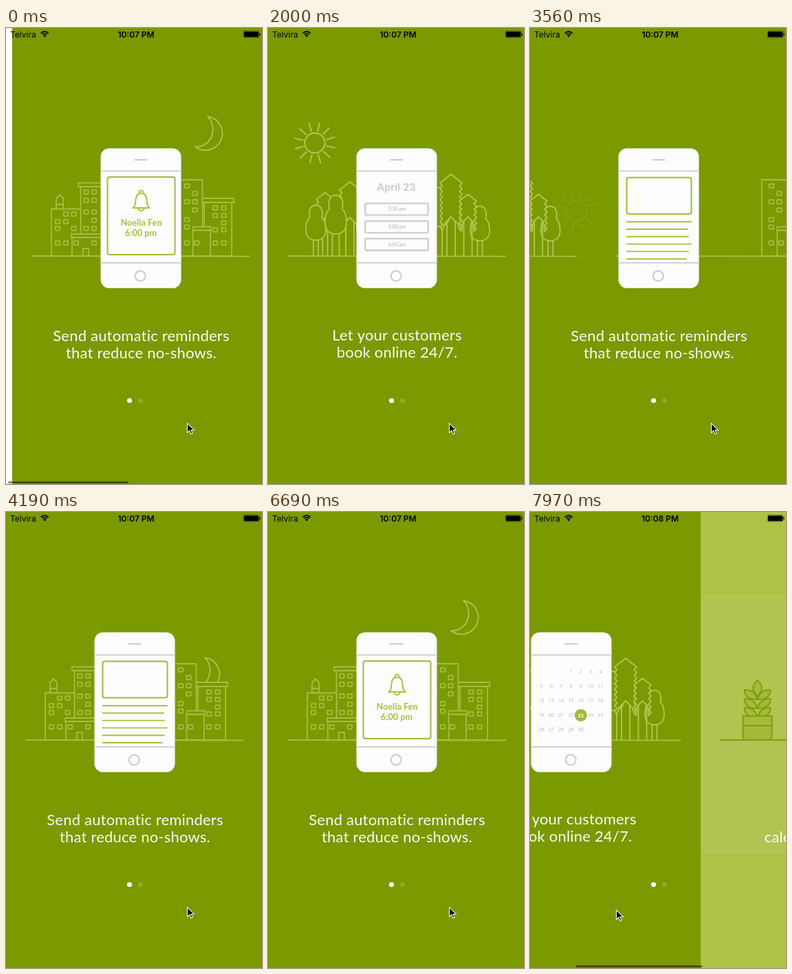
Animation of 372x664 px, one loop 8000 ms. Source, as an HTML page with a canvas:

```html
<!DOCTYPE html>
<html lang="en">
<head>
<meta charset="utf-8">
<title>Booking app tour</title>
<style>
html, body { margin: 0; width: 100%; height: 100%; overflow: hidden; background: #fff; }
canvas { display: block; width: 372px; height: 664px; }
</style>
</head>
<body>
<canvas id="stage"></canvas>
<script>
const W = 372, H = 664, PAGE = 375, LOOP = 8000;
const GREEN = '#7b9900', LIME = '#b0c54c', DIM = '#a8bd40', GRAY = '#cbcbcb';
const LATO = 'Lato, sans-serif', INTER = 'Inter, sans-serif', NOTO = '"Noto Sans", sans-serif';

const canvas = document.getElementById('stage');
const c = canvas.getContext('2d');
const dpr = window.devicePixelRatio || 1;
canvas.width = W * dpr;
canvas.height = H * dpr;

const clamp = v => Math.max(0, Math.min(1, v));
const span = (t, a, b) => clamp((t - a) / (b - a));
const mix = (a, b, p) => a + (b - a) * p;
const ease = (t, a, b) => {
  const p = span(t, a, b);
  return p < .5 ? 4 * p ** 3 : 1 - (2 - 2 * p) ** 3 / 2;
};

function group(alpha, x, y, draw) {
  if (alpha <= 0) return;
  c.save();
  c.globalAlpha *= alpha;
  c.translate(x, y);
  draw();
  c.restore();
}

function pen(color, width) {
  c.strokeStyle = color;
  c.lineWidth = width;
  c.lineCap = c.lineJoin = 'round';
}

function line(x1, y1, x2, y2) {
  c.beginPath();
  c.moveTo(x1, y1);
  c.lineTo(x2, y2);
  c.stroke();
}

function disc(x, y, r, color) {
  c.fillStyle = color;
  c.beginPath();
  c.arc(x, y, r, 0, 7);
  c.fill();
}

function ring(x, y, r) {
  c.beginPath();
  c.arc(x, y, r, 0, 7);
  c.stroke();
}

function round(x, y, w, h, r) {
  c.beginPath();
  c.roundRect(x, y, w, h, r);
}

function fillPath(d, color) {
  c.fillStyle = color;
  c.fill(new Path2D(d));
}

// A shape given as path data: filled to hide what is behind, then outlined.
function shape(d, fill) {
  if (fill) fillPath(d, fill);
  c.stroke(new Path2D(d));
}

function box(x1, y1, x2, y2) {
  shape(`M${x1} ${y1}H${x2}V${y2}H${x1}Z`, GREEN);
}

function text(s, x, y, font, color, align = 'center', spacing = 0) {
  c.font = font;
  c.fillStyle = color;
  c.textAlign = align;
  c.letterSpacing = spacing + 'px';
  c.fillText(s, x, y);
}

function caption(lines, y) {
  lines.forEach((s, i) => text(s, 187.5, y + 25 * i, '22px ' + LATO, '#fafcf2', 'center', .2));
}

function windows(spots) {
  for (const [y, ...xs] of spots) {
    for (const x of xs) {
      round(x - 3.2, y - 2.8, 6.4, 5.6, .5);
      c.stroke();
    }
  }
}

function ground(x) {
  pen(DIM, 1.8);
  line(29 + x, 332, 345.5 + x, 332.5);
}

function city() {
  pen(DIM, 1.8);
  box(99.5, 231, 136, 332);
  box(96, 225.5, 136, 231);
  windows([[239, 107.5, 119], [251, 107.5, 119], [268, 107.5, 119], [280, 119], [292, 107.5, 119]]);
  shape('M64 263V248L69 243L74 248V263M64 257H74');
  box(57, 263.5, 99.5, 332);
  windows([[271, 78, 89.5], [282, 66, 78], [292, 66, 89.5], [313, 66, 78]]);
  box(87, 305, 136, 332);
  box(86, 300, 136, 305);
  windows([[313, 93, 119]]);
  shape('M103 332V321H111V332');

  box(240, 221, 276.5, 332);
  windows([[230, 254], [241, 265.5], [253, 254, 265.5], [265, 265.5], [279, 254], [290, 254], [313, 254]]);
  box(279, 254, 319, 332);
  box(276.5, 248, 322, 254);
  windows([[262, 295, 307.5], [273, 295, 307.5], [284, 307.5], [294, 295, 307.5], [313, 295, 307.5]]);
  box(262.5, 294.5, 288, 332);
  box(262.5, 289.5, 289, 294.5);
  windows([[313, 268]]);
}

function moon(t) {
  const left = t < 3000 ? 0 : 83 * (Math.max(0, 6690 - t) / 2500) ** 2.5;
  if (left > 122) return;
  c.save();
  c.translate(left * .058, left);
  pen(LIME, 1.8);
  shape('M284 129A24.6 24.6 0 1 1 266 173C293 173 298 142 284 129Z');
  c.restore();
}

function trunk(x, y, half) {
  line(x - half, y, x - half, 332);
  line(x + half, y, x + half, 332);
}

function leafy(x, top, bottom, w, half = 3.5) {
  const h = bottom - top, neck = top + h * .36;
  const at = (dx, y) => `${x + dx * w} ${y}`;
  trunk(x, bottom - 6, half);
  shape(`M${at(0, bottom)}C${at(-.75, bottom)} ${at(-1, bottom - h * .15)} ${at(-1, bottom - h * .3)}
    C${at(-1, neck + h * .15)} ${at(-.85, neck + h * .05)} ${at(-.6, neck)}
    C${at(-.8, top + h * .1)} ${at(-.4, top)} ${at(0, top)}
    C${at(.4, top)} ${at(.8, top + h * .1)} ${at(.6, neck)}
    C${at(.85, neck + h * .05)} ${at(1, neck + h * .15)} ${at(1, bottom - h * .3)}
    C${at(1, bottom - h * .15)} ${at(.75, bottom)} ${at(0, bottom)}Z`, GREEN);
}

// Jagged sides between a pointed top and a roof-shaped notch above the trunk.
function pine(x, top, bottom, w, half = 6) {
  const shoulder = top + w * .8, notch = bottom - 22;
  const steps = Math.floor((bottom - shoulder) / 4);
  let right = '', left = '';
  for (let i = 0; i <= steps; i++) {
    const y = shoulder + i * 4, dx = w - (i % 2) * 3.5;
    right += `L${x + dx} ${y}`;
    left = `L${x - dx} ${y}` + left;
  }
  trunk(x, notch + 3, half);
  shape(`M${x} ${top}${right}L${x + w * .6} ${notch + w * .6}L${x} ${notch}
    L${x - w * .6} ${notch + w * .6}${left}Z`, GREEN);
}

function trees() {
  pen(LIME, 1.9);
  pine(119, 224, 298, 15);
  pine(83, 239.5, 298, 13, 3.5);
  leafy(69.5, 258, 309, 14.5);
  leafy(98.5, 243.5, 300, 15.5, 5);
  leafy(248, 232, 289, 16, 5);
  leafy(308, 259.5, 310, 14);
  pine(266, 213, 297, 16);
  pine(290.5, 242, 297, 12.5);
}

function sun(t) {
  pen(LIME, 2.1);
  c.save();
  c.translate(68, 167.5);
  ring(0, 0, 14.6);
  c.rotate((t - 2910) / 1000 * 18 * Math.PI / 180);
  for (let i = 0; i < 12; i++) {
    c.rotate(Math.PI / 6);
    line(0, -18, 0, -29.8);
  }
  c.restore();
}

function calendar() {
  for (let d = 1; d <= 30; d++) {
    const cell = d + 2;
    const x = 143.8 + (cell % 7) * 14.25, y = 232 + Math.floor(cell / 7) * 21.1;
    const picked = d === 23;
    if (picked) disc(x, y + .6, 9, '#a2b838');
    text(d, x, picked ? y + 3.3 : y + 2.7, (picked ? 'bold 7.5px ' : '7px ') + NOTO, picked ? '#fff' : '#b9b9b9');
  }
}

function slots(t) {
  text('April 23', 186.5, 237, 'bold 15.5px ' + LATO, '#cacaca', 'center', .2);
  const pick = span(t, 2300, 2450);
  ['3:30 pm', '5:00 pm', '6:00 pm'].forEach((s, i) => {
    const y = 254.2 + 25.7 * i;
    pen('#cfcfcf', 2.4);
    round(141.2, y + 1.2, 91.6, 17, 2);
    c.stroke();
    text(s, 187.5, y + 12.2, 'bold 7px ' + LATO, '#c0c0c0');
    if (i === 2) group(pick, 0, 0, () => {
      c.fillStyle = '#b0c352';
      round(140, y, 94, 20.3, 3);
      c.fill();
      text(s, 187.5, y + 12.7, 'bold 7.5px ' + LATO, '#fff');
    });
  });
}

function bell() {
  pen('#a9c13c', 2);
  shape(`M175.5 262C179 259 179 256 179.5 250C180 244 182 240.5 187.5 240.5
    C193 240.5 195 244 195.5 250C196 256 196 259 199.5 262Z
    M184.5 240.5C184 235 191 235 190.5 240.5M183.5 262.5C184 267.5 191 267.5 191.5 262.5`);
}

function notice(t) {
  const grow = t < 3000 ? 1 : ease(t, 4280, 4720);
  pen('#a3b93a', 2);
  round(mix(140.5, 138.5, grow), mix(217.5, 217, grow), mix(94, 98, grow), mix(53, 113, grow), 3);
  c.stroke();
  group(1 - span(grow, 0, .5), 0, 0, () => {
    pen('#a9c13c', 1.9);
    [234, 229, 230, 234, 230, 227].forEach((x, i) => line(140.5, 282 + i * 10.8, x, 282 + i * 10.8));
  });
  group(span(grow, .5, 1), 0, 0, () => {
    bell();
    text('Noelia Fen', 187.5, 287.5, 'bold 12.7px ' + LATO, '#a9c13c');
    text('6:00 pm', 187, 303, 'bold 12.7px ' + LATO, '#a9c13c');
  });
}

function shake(t) {
  const power = 2 * span(t, 4720, 4850) * (1 - span(t, 5500, 6400));
  return -power * Math.cos((t - 5150) / 160 * Math.PI * 2);
}

function phone(t, day, slide) {
  c.save();
  c.translate(shake(t), 0);
  c.fillStyle = '#fdfdfd';
  round(128.5, 175.2, 117, 203.6, 12.5);
  c.fill();

  c.save();
  c.beginPath();
  c.rect(129, 209, 116, 132.5);
  c.clip();
  const panning = t >= 2980 && t < 6980;
  const scroll = t < 6980 ? 116 * ease(t, 1220, 1800) : 0;
  group(panning ? +(slide < 1) : day, 0, -scroll - 134 * slide, () => {
    calendar();
    c.translate(0, 116);
    slots(t);
  });
  group(panning ? 1 : 1 - day, 0, panning ? 134 * (1 - slide) : 0, () => notice(t));
  c.restore();

  pen('#d2d2d2', 2);
  c.lineCap = 'butt';
  line(128.5, 208.3, 245.5, 208.3);
  line(128.5, 342, 245.5, 342);
  pen(GRAY, 2);
  line(178, 192, 195.5, 192);
  ring(186.2, 361, 7.5);
  c.restore();
}

function bookingPage(t) {
  c.fillStyle = GREEN;
  c.fillRect(0, 0, PAGE, H);

  const panning = t >= 2980 && t < 6980;
  const pan = ease(t, 2980, 3950);
  // 1 = daytime scene, 0 = evening scene
  const day = t < 2980 ? ease(t, 350, 850) : ease(t, 6980, 7600);
  const cityX = panning ? PAGE * (1 - pan) : 0;
  const treesX = panning ? -PAGE * pan : 0;
  const set = panning ? span(t, 2980, 3700) : 0;

  group(panning ? 1 - set : day, 0, 150 * set * set, () => sun(t));
  group(panning ? 1 : 1 - day, 0, 0, () => moon(t));
  group(panning ? 1 : 1 - day, cityX, 0, city);
  group(panning ? +(pan < 1) : day, treesX, 0, trees);
  ground(cityX);
  if (panning) ground(treesX);
  phone(t, day, panning ? ease(t, 3050, 3600) : 0);

  const words = panning ? 1 - ease(t, 3000, 3600) : day;
  group(words, 0, 0, () => caption(['Let your customers', 'book online 24/7.'], 455));
  group(1 - words, 0, 0, () => caption(['Send automatic reminders', 'that reduce no-shows.'], 456));
}

function plantPage() {
  c.fillStyle = '#adc246';
  c.fillRect(0, 0, PAGE, H);
  c.fillStyle = '#b0c452';
  c.fillRect(0, 121, PAGE, 376);
  pen('#7f9e0a', 2);
  line(29, 332, 346, 332);
  for (const y of [290, 277, 264]) {
    for (const side of [-1, 1]) {
      const x = d => 82.5 + side * d;
      shape(`M82.5 ${y + 9}Q${x(19)} ${y + 9} ${x(19)} ${y - 5}Q${x(4)} ${y - 6} 82.5 ${y + 9}Z`, '#a5ba3c');
    }
  }
  shape('M82.5 245Q95 256 82.5 268Q70 256 82.5 245Z', '#a5ba3c');
  shape('M61.5 297H103.5V326Q103.5 332 98 332H67Q61.5 332 61.5 326Z M61.5 311H103.5', '#a5b93c');
  text('Keep your', 187.5, 455, '22px ' + LATO, '#fafcf2', 'center', .2);
  text('calendar up to date.', 92.5, 480.5, '22px ' + LATO, '#fafcf2', 'left', .2);
}

function statusBar(t) {
  text('Telvira', 6, 13.5, '12px ' + INTER, '#000', 'left');
  text(t < 7500 ? '10:07 PM' : '10:08 PM', 189, 13.5, '600 12px ' + INTER, '#000');
  pen('#000', 1.7);
  c.lineCap = 'butt';
  for (const r of [7.6, 4.7]) {
    c.beginPath();
    c.arc(56.2, 12.8, r, -Math.PI * .76, -Math.PI * .24);
    c.stroke();
  }
  c.fillStyle = '#000';
  c.beginPath();
  c.moveTo(56.2, 13.3);
  c.arc(56.2, 13.3, 3, -Math.PI * .76, -Math.PI * .24);
  c.fill();
  pen('#000', .5);
  round(345.2, 4.7, 22.4, 9.2, 1.8);
  c.stroke();
  round(346, 5.5, 20.8, 7.6, 1);
  c.fill();
  c.fillRect(368.2, 7.5, 1.3, 3.5);
}

function scrollBar(t, x) {
  const alpha = t < 7790 ? 1 - span(t, 450, 780) : 1;
  group(alpha, 0, 0, () => {
    c.fillStyle = 'rgba(0,0,0,.5)';
    round(3 + Math.max(0, -x / 2), 660.3, 184 - Math.max(0, x), 2.6, 1.3);
    c.fill();
  });
}

function cursor(t, x) {
  const reach = ease(t, 7250, 7700);
  const drag = t >= 7790 ? x : 0;
  c.save();
  c.translate(mix(263, 252, reach) + drag, mix(574.5, 580, reach) + drag * .012);
  fillPath('M0 0V16L3.6 12.6L5.7 17.4L8.7 16.1L6.7 11.5H11.5Z', '#fff');
  fillPath('M1 2.4V13.6L3.9 10.8L6.2 16.1L7.4 15.5L5.2 10.5H9.1Z', '#000');
  c.restore();
}

function scrollX(t) {
  if (t < 4000) return 9 * (1 - span(t, 90, 450)) ** 3;
  return -127 * span(t, 7790, 7970) ** 1.5;
}

function draw(t) {
  c.setTransform(dpr, 0, 0, dpr, 0, 0);
  c.fillStyle = '#fff';
  c.fillRect(0, 0, W, H);
  const x = scrollX(t);
  group(1, x, 0, () => bookingPage(t));
  if (x < 0) group(1, x + PAGE, 0, plantPage);
  disc(179.5, 542.5, 3.6, '#fff');
  disc(195.5, 542.5, 3.6, '#90ab29');
  statusBar(t);
  scrollBar(t, x);
  cursor(t, x);
}

function tick() {
  draw(performance.now() % LOOP);
  requestAnimationFrame(tick);
}
tick();
</script>
</body>
</html>
```
